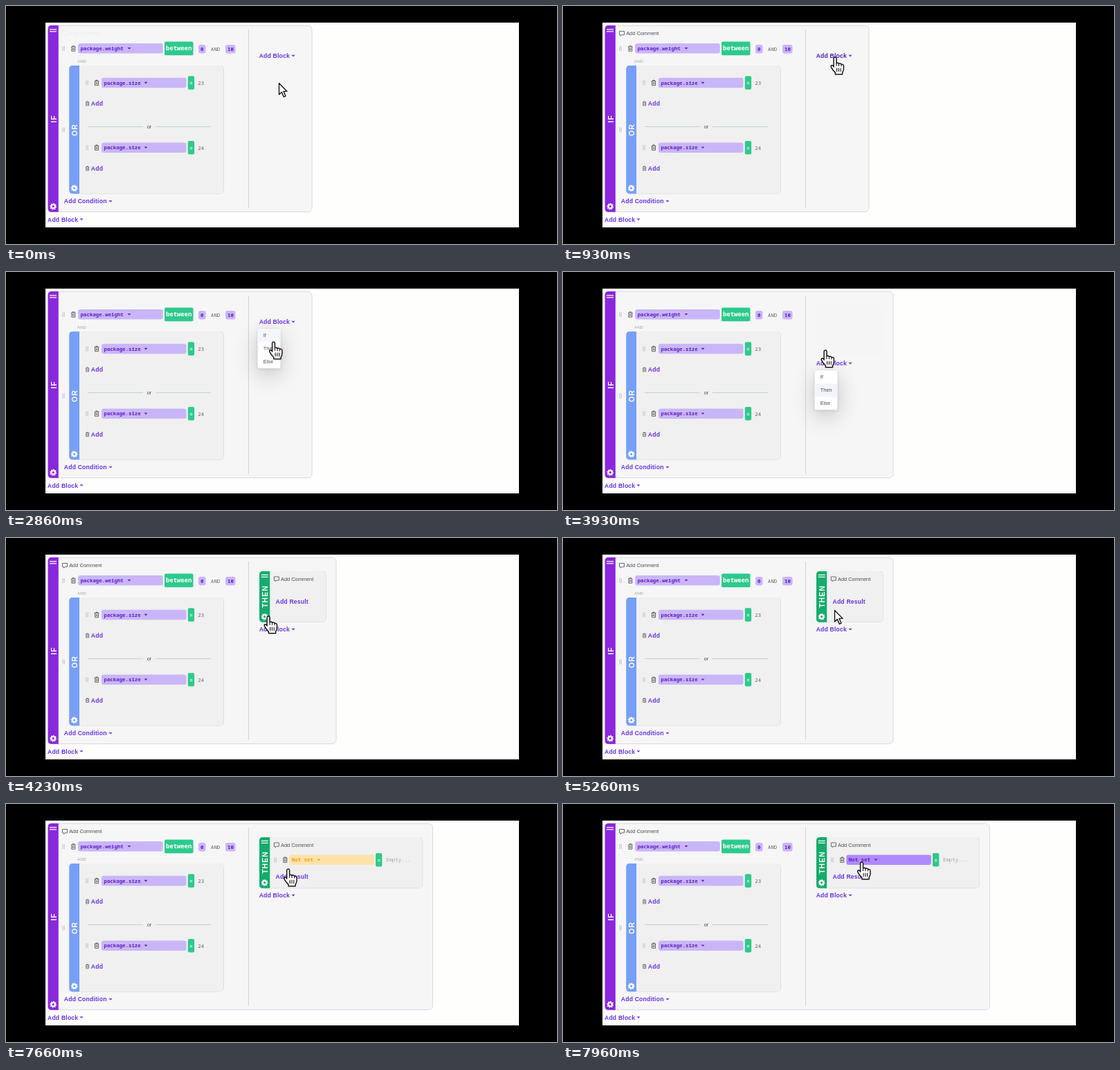
Write an HTML page that moves like this. It is 796x344 px and loops after 8 s.

```html
<!DOCTYPE html>
<html lang="en">
<head>
<meta charset="utf-8">
<title>Rule builder</title>
<style>
  html, body { margin: 0; height: 100%; overflow: hidden; background: #000; }
  svg { display: block; width: 100vw; height: 100vh; }
  text { white-space: pre; }
  .link { font: bold 8.6px "Liberation Sans", sans-serif; letter-spacing: .2px; fill: #6633e6; }
  .link.hover { fill: #4620ae; }
  .mono { font: 500 7.4px "Noto Sans Mono", monospace; fill: #666; }
  .field { font-weight: 600; fill: #611fc4; }
  .op { font-weight: 700; fill: #fff; }
  .sans { font: 7.4px "Liberation Sans", sans-serif; fill: #4c4c55; }
  .side { font: bold 10.5px "Liberation Sans", sans-serif; letter-spacing: 1px; fill: #fff;
          text-anchor: middle; dominant-baseline: central; }
  .panel { filter: drop-shadow(.5px .7px .5px #0005); }
  #menu { filter: drop-shadow(0 1px 2px #0002) drop-shadow(0 9px 15px #0003); }
  #cursor path { stroke: #1c1518; stroke-linejoin: round; stroke-linecap: round; }
</style>
</head>
<body>
<svg id="stage" viewBox="0 0 796 344" preserveAspectRatio="none"></svg>
<script>
const LOOP = 8000;
const LILAC = '#c9b6f8', GREEN = '#2dca8c';

const rect = (x, y, w, h, r, fill, extra = '') =>
  `<rect x="${x}" y="${y}" width="${w}" height="${h}" rx="${r}" fill="${fill}" ${extra}/>`;
const text = (x, y, cls, str, extra = '') =>
  `<text x="${x}" y="${y}" class="${cls}" ${extra}>${str}</text>`;
const stroke = (d, color, width = 1) =>
  `<path d="${d}" fill="none" stroke="${color}" stroke-width="${width}"/>`;
const caret = (x, y, color = '#6633e6') =>
  `<path d="M${x - 2.5} ${y - 1.2}h5l-2.5 2.6z" fill="${color}"/>`;
const link = (x, y, str, caretX) =>
  text(x, y, 'link', str) + (caretX ? caret(caretX, y - 3.2) : '');

const gear = (x, y) =>
  `<g fill="none" stroke="#fff"><circle cx="${x}" cy="${y}" r="2.7" stroke-width="2.2"/>
   <circle cx="${x}" cy="${y}" r="4.1" stroke-width="1.6" pathLength="16" stroke-dasharray="1"/></g>`;
const grip = (x, y) =>
  stroke(`M${x - 1} ${y - 3.5}v7M${x + 1.2} ${y - 3.5}v7`, '#c6c6cb', 1.1);
const trash = (x, y, s = 1) =>
  `<g transform="translate(${x} ${y}) scale(${s})">` +
  stroke('M-3.3-2.5h6.6M-1.2-2.7v-1.1h2.4v1.1M-2.5-2.3v6h5v-6M-.8-.8v3M.8-.8v3', '#55555c', .9) + '</g>';
const comment = (id, x, y) =>
  `<g id="${id}">` +
  stroke(`M${x} ${y - 3}h7v5.2h-3.4l-1.8 1.7v-1.7h-1.8z`, '#5a5a66', .9) +
  text(x + 9.7, y + 2.6, 'sans', 'Add Comment') + '</g>';

// Coloured strip on the left of a block, rounded on its outer side.
const sidebar = (x, y, w, h, color, label, labelY) =>
  `<path d="M${x + w} ${y}v${h}h${5 - w}q-5 0-5-5v${10 - h}q0-5 5-5z" fill="${color}"/>` +
  text(0, 0, 'side', label, `transform="translate(${x + w / 2 + .3} ${labelY}) rotate(-90)"`) +
  gear(x + w / 2, y + h - 8);
const handle = (x, y) => stroke(`M${x} ${y}h10M${x} ${y + 3}h10`, '#fff', 1.3);

const badge = (x, w, str) =>
  rect(x, 56, w, 12.5, 3, LILAC) + text(x + 3, 64.8, 'mono field', str);
const equals = (x, y) =>
  rect(x, y - 9.7, 9.3, 19.5, 2, GREEN) + text(x + 2.4, y + 2.8, 'mono op', '=');
const field = (x, y, str, caretX) =>
  rect(x, y - 7.2, 122.5, 14.5, 3, LILAC) + text(x + 3.5, y + 2.5, 'mono field', str) +
  caret(caretX, y, '#611fc4');
const sizeRow = (y, value) =>
  grip(117, y) + trash(131, y) + field(138, y, 'package.size', 202) +
  equals(262.8, y) + text(277.3, y + 2.9, 'mono', value) +
  trash(117.6, y + 30, .8) + link(122.8, y + 32.8, 'Add');

stage.innerHTML = `
  ${rect(57, 24, 684, 296, 0, '#fefefd')}
  ${rect(61, 28.3, 381, 269.2, 6, '#f6f6f7', 'id="outer" stroke="#d6d6dc" stroke-width=".9"')}
  ${sidebar(60.6, 28, 15.2, 269.7, '#8b27dc', 'IF', 163)}
  ${handle(63, 33.8)}
  ${stroke('M350.5 34V292', '#d3d3d9')}
  ${comment('ifComment', 81.5, 39.5)}

  ${grip(83, 61.5)}${trash(97.3, 61.5)}${field(104.2, 61.2, 'package.weight', 178)}
  ${rect(229, 51.5, 41.5, 19.7, 2, GREEN)}
  ${text(231, 64.4, 'mono op', 'between', 'style="font-size:8.9px"')}
  ${badge(278, 10.5, '0')}${text(296, 64.9, 'mono', 'AND')}${badge(317, 14.5, '10')}
  ${text(103, 81.8, 'sans', 'AND', 'style="font-size:6.2px;fill:#a5a5aa"')}

  ${grip(83, 179)}
  ${rect(91.5, 86, 223, 185.3, 5, '#f0f0f0', 'class="panel"')}
  ${sidebar(91.3, 86, 14.7, 185.3, '#769ff8', 'OR', 179)}
  ${sizeRow(111, '23')}
  ${stroke('M118 174.5H198M216 174.5H296', '#c3ced0')}
  ${text(203.7, 177, 'sans', 'or')}
  ${sizeRow(204.7, '24')}
  ${link(83.8, 285.4, 'Add Condition', 151)}
  ${link(60, 311.6, 'Add Block', 109)}

  <g id="then">
    ${rect(366.3, 48, 96, 73.7, 5, '#f0f0f0', 'id="thenPanel" class="panel"')}
    ${sidebar(366, 48, 15.2, 73.7, '#16ab6c', 'THEN', 84.5)}
    ${handle(368.7, 53.3)}
    ${comment('thenComment', 387.3, 59)}
    <g id="result">
      ${grip(389, 80.7)}${trash(403.3, 80.7)}
      <g id="target">${field(409.3, 80.7, 'Not set', 452)}</g>
      ${equals(534, 80.7)}${text(549, 83.4, 'mono', 'Empty...', 'style="fill:#a4a4a8"')}
    </g>
    <g id="addResult">${link(389.5, 95.2, 'Add Result')}</g>
  </g>

  <g id="block">
    <g id="addBlock">${link(365.7, 75.2, 'Add Block', 415)}</g>
    <g id="menu">
      ${rect(363.5, 82.3, 33, 57, 2.5, '#fff')}
      ${rect(363.5, 82.5, 33, 19, 0, '#f1f4fa', 'id="row"')}
      ${['If', 'Then', 'Else'].map((s, i) => text(371.8, 94.4 + i * 19, 'sans', s)).join('')}
    </g>
  </g>

  <g id="cursor">
    <path id="arrow" fill="#fff" stroke-width="1.4"
      d="M.5.5V17l3.8-3.6 3 7 2.7-1.2-3-6.8h5z"/>
    <g id="hand">
      <path fill="#fff" stroke-width="1.5" d="M-1.9 1.8Q-1.8 0 0 0T2 1.8V8.6Q4.6 7.6 5.5 9.3
        8 8.4 9 10.2 12.2 9.8 12.4 12.4V17.5Q12.2 19.8 10.6 22V24.8H.4V22.4Q-3.6 18.6-5.6 14.4
        -6.4 11.8-4.2 11.8-2.8 12-1.9 14z"/>
      <path fill="none" stroke-width="1.1" d="M2 8.6V12.4M5.5 9.3V12.6M9 10.2V13M2.6 16v4.5M5.4 16v4.5M8.2 16v4.5"/>
    </g>
  </g>`;

const $ = id => document.getElementById(id);
const ramp = (t, a, b) => Math.min(1, Math.max(0, (t - a) / (b - a)));
const mix = (a, b, k) => a + (b - a) * k;
const blend = (from, to, k) => `rgb(${from.map((c, i) => Math.round(mix(c, to[i], k)))})`;
const show = (id, opacity) => { $(id).style.opacity = opacity; };

// Pointer tip: time, x, y
const track = [
  [0, 394, 111], [500, 394, 111], [640, 395, 101], [800, 394, 83], [930, 393, 74],
  [2460, 393, 74], [2860, 386.5, 101], [3290, 379, 113],
  [4930, 379, 113], [5260, 392, 104], [5730, 404, 95], [5860, 406, 94.5],
  [6030, 406, 94.5], [6060, 407.5, 94], [7660, 407.5, 94], [7780, 415, 92], [7960, 431.5, 84], [LOOP, 431.5, 84]
];

function tipAt(t) {
  const i = Math.max(1, track.findIndex(p => p[0] > t));
  const [a, b] = [track[i - 1], track[i]];
  const k = ramp(t, a[0], b[0]);
  return [mix(a[1], b[1], k), mix(a[2], b[2], k)];
}

function render(t) {
  const [x, y] = tipAt(t);
  const hasThen = t >= 3930, hasResult = t >= 6700;

  $('outer').setAttribute('width', hasResult ? 555.5 : hasThen ? 416 : 381);
  $('thenPanel').setAttribute('width', hasResult ? 235.5 : 96);
  $('block').setAttribute('transform', `translate(0 ${hasThen ? 60 : 0})`);
  $('addResult').setAttribute('transform', `translate(0 ${hasResult ? 13.3 : 0})`);

  show('ifComment', t < 2460 ? mix(.05, 1, ramp(t, 30, 230))
    : t < 3930 ? 1 - ramp(t, 2560, 2800) : ramp(t, 3930, 4230));
  show('then', ramp(t, 3930, 4230));
  show('menu', hasThen ? 1 - ramp(t, 3930, 4160) : t < 1460 ? 0 : mix(.5, 1, ramp(t, 1460, 1560)));
  show('result', hasResult ? mix(.1, 1, ramp(t, 6700, 7000)) : 0);

  const row = Math.floor((y - 82.5) / 19);
  $('row').setAttribute('y', 82.5 + 19 * Math.min(2, Math.max(0, row)));
  show('row', row < 0 ? 0 : t < 3760 ? .8 : 1);

  const overBlock = t < 3930 && y < 78;
  const overResult = t >= 5260 && t < 6700 && y < 97.5;
  $('addBlock').firstChild.classList.toggle('hover', overBlock);
  $('addResult').firstChild.classList.toggle('hover', overResult);

  // The empty field turns from amber to violet under the pointer.
  const hot = ramp(t, 7760, 7940);
  const [box, label, mark] = $('target').children;
  box.setAttribute('fill', blend([255, 226, 170], [174, 138, 252], hot));
  label.style.fill = blend([240, 160, 20], [91, 28, 190], hot);
  mark.setAttribute('fill', label.style.fill);

  const isHand = overBlock || overResult || t >= 6700 || (t > 2500 && x < 393 && t < 4980);
  show('hand', +isHand);
  show('arrow', +!isHand);
  $('cursor').setAttribute('transform', `translate(${x} ${y})`);
}

const start = performance.now();
function tick() {
  render((performance.now() - start) % LOOP);
  requestAnimationFrame(tick);
}
tick();
</script>
</body>
</html>
```
